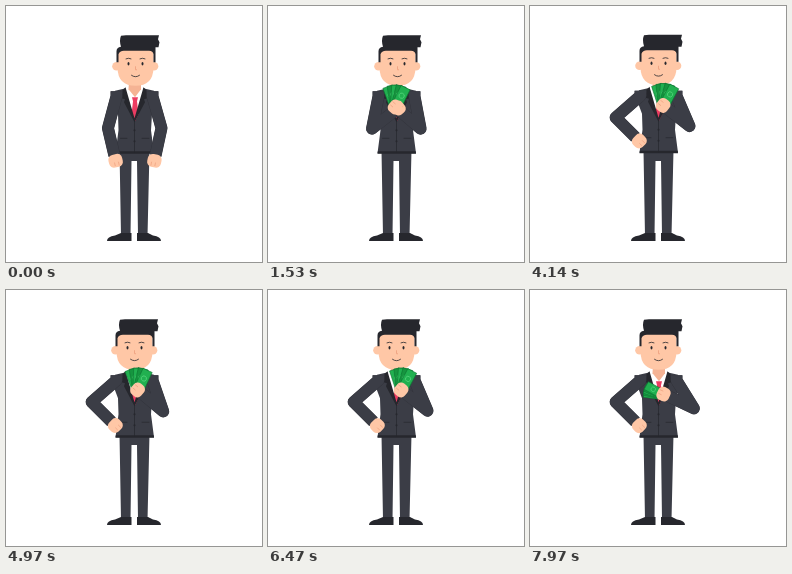
Write an HTML page that moves like this. It is 256 by 256 pixels and loops after 8000 ms.

```html
<!DOCTYPE html>
<html lang="en">
<head>
<meta charset="utf-8">
<title>Man with cash</title>
<style>
  html, body { margin: 0; width: 100%; height: 100%; overflow: hidden; background: #fff; }
  svg { display: block; width: 100%; height: 100%; }
  .suit { fill: #3b3d46; }
  .dark { fill: #26272d; }
  .skin { fill: #ffc7a6; }
  .ink { fill: none; stroke: #26272d; stroke-linecap: round; }
  .sleeve, .seam { fill: none; stroke: #3b3d46; stroke-width: 11.4; stroke-linejoin: round; }
  .seam { stroke: #303139; stroke-width: 12; }
</style>
</head>
<body>
<svg viewBox="0 0 256 256">
  <path class="suit" d="M113.500 144H143.500L141.500 230H132L131 155H125.500L124.500 230H115Z"/>
  <path class="dark" d="M101 235Q101 230.500 109 229.500L115 227H125.500V235ZM155 235Q155 230.500 147 229.500L142 227H131V235Z"/>
  <g id="upper">
    <path class="suit" d="M120 82L109 84.500L106 92L112 108L112.500 124L109.500 147H148L145 124L146 108L151 92L148 84.500L137 82Z"/>
    <path class="dark" d="M109.800 145H147.700L148 147.500H109.500Z"/>
    <path fill="#fff" d="M119.500 81H137.500L136 96L128.500 114L120 93Z"/>
    <path fill="#ec3c62" d="M126 91H132L131 95L132.500 108L129 115L125.500 108L127 95Z"/>
    <path class="dark" d="M119.500 81L116.500 84L115.500 92L119 93L118 96L128.500 116V112ZM137.500 81L140.500 84L141.500 92L138 93L139 96L128.500 116V112Z"/>
    <path class="ink" stroke-width=".7" d="M128.500 115V146M114.500 132H121M136 132H143"/>
    <g class="dark"><circle cx="128.500" cy="124" r="1"/><circle cx="128.500" cy="135" r="1"/></g>
    <path fill="#f5b394" d="M123 74H135V83L129 91L122.500 83Z"/>
    <g id="head">
      <g class="skin">
        <circle cx="110.500" cy="60" r="4.300"/><circle cx="148" cy="60" r="4.300"/>
        <path d="M111.500 43H147.500V62Q147 79.500 129.500 79.500Q112 79.500 111.500 62Z"/>
      </g>
      <path class="dark" d="M110.500 56V45Q110.500 41 115 40.500Q113 34 115 29.500L120 29H153L152 33L153.500 36L152.500 41H149.500V56H147.500V48Q147 44.500 143 44.500H118Q113.500 44.500 112.500 48V56Z"/>
      <g class="dark"><ellipse cx="122.500" cy="57.500" rx="1" ry="1.700"/><ellipse cx="136.500" cy="57.500" rx="1" ry="1.700"/></g>
      <path class="ink" stroke-width=".8" d="M120 52.500Q122.500 51.300 125 52.500M134 52.500Q136.500 51.300 139 52.500"/>
      <path class="ink" stroke-width=".8" d="M125.500 69Q129.500 72 133.500 69"/>
      <path fill="none" stroke="#f0a685" d="M129.500 60V63.500H131"/>
    </g>
    <g id="arms"></g>
  </g>
</svg>
<script>
const LOOP = 8000, BONE = 33, BILLS = 5;
const byId = id => document.getElementById(id);

function add(parent, tag, attrs = {}) {
  const node = document.createElementNS('http://www.w3.org/2000/svg', tag);
  for (const key in attrs) node.setAttribute(key, attrs[key]);
  return parent.appendChild(node);
}

const armLayer = byId('arms');

function makeArm(side) {
  return { side, seam: add(armLayer, 'path', { class: 'seam' }),
           sleeve: add(armLayer, 'path', { class: 'sleeve' }) };
}

function makeHand() {
  const hand = add(armLayer, 'g');
  add(hand, 'rect', { class: 'skin', x: -6, y: -7, width: 13, height: 14, rx: 5 });
  add(hand, 'path', { d: 'M2 -2.500H6M2 1.500H5.500', stroke: '#f0a685', 'stroke-width': .8, fill: 'none' });
  return hand;
}

function makeBill(i) {
  const bill = add(fan, 'g');
  add(bill, 'rect', { x: -5, y: -23, width: 10, height: 23, fill: i % 2 ? '#16953f' : '#21b050', stroke: '#0d7632', 'stroke-width': .6 });
  add(bill, 'circle', { cy: -14, r: 2.600, fill: 'none', stroke: '#54d47b', 'stroke-width': .8 });
  return bill;
}

const left = makeArm(-1), right = makeArm(1);
const fan = add(armLayer, 'g');
const bills = Array.from({ length: BILLS }, (_, i) => makeBill(i));
left.hand = makeHand();
right.hand = makeHand();

const point = (x, y) => ({ x, y });
const mix = (a, b, u) => a + (b - a) * u;
const move = (a, b, u) => point(mix(a.x, b.x, u), mix(a.y, b.y, u));
const wave = (t, period) => Math.cos(t / period * 2 * Math.PI);

function ease(t, from, to) {
  const u = Math.min(1, Math.max(0, (t - from) / (to - from)));
  return u * u * (3 - 2 * u);
}

const restLeft = point(109.5, 154), chestLeft = point(130, 102), hip = point(109, 135);
const restRight = point(148.5, 154), chestRight = point(127.5, 101);
const showOff = point(132.5, 100), pocket = point(134, 104);

// Two equal bones, elbow always bent outwards.
function poseArm(arm, { x, y }) {
  const sx = 128.5 + arm.side * 18, sy = 90;
  const dx = x - sx, dy = y - sy, dist = Math.hypot(dx, dy);
  const bend = Math.sqrt(Math.max(0, BONE ** 2 - dist ** 2 / 4)) / dist;
  const ex = sx + dx / 2 + arm.side * dy * bend;
  const ey = sy + dy / 2 - arm.side * dx * bend;
  const angle = Math.atan2(y - ey, x - ex);
  const wx = x - 5 * Math.cos(angle), wy = y - 5 * Math.sin(angle);
  const path = `M${sx} ${sy - 5}L${sx} ${sy}L${ex} ${ey}L${wx} ${wy}`;
  arm.seam.setAttribute('d', path);
  arm.sleeve.setAttribute('d', path);
  arm.hand.setAttribute('transform', `translate(${x} ${y}) rotate(${angle * 180 / Math.PI}) scale(1 ${-arm.side})`);
}

function draw(t) {
  const raise = ease(t, 300, 1500), open = ease(t, 1050, 1500);
  const drop = ease(t, 2660, 3340), stow = ease(t, 7450, 7970);
  const sway = wave(t - 4140, 2420) * drop * (1 - stow);

  const leftHand = move(move(restLeft, chestLeft, raise), hip, drop);
  const rightHand = move(move(move(restRight, chestRight, raise), showOff, drop), pocket, stow);
  rightHand.x += sway;
  poseArm(left, leftHand);
  poseArm(right, rightHand);

  const tilt = mix(3 + 2 * sway, -72, stow), spread = mix(46 * open, 22, stow);
  fan.setAttribute('transform', `translate(${rightHand.x} ${rightHand.y + 1}) rotate(${tilt}) scale(${open * mix(1, .88, stow)})`);
  bills.forEach((bill, i) => bill.setAttribute('transform', `rotate(${(i / (BILLS - 1) - .5) * spread})`));

  byId('upper').setAttribute('transform', `translate(0 ${.3 * wave(t, 1600)})`);
  byId('head').setAttribute('transform', `translate(${-drop} 0)`);
}

const start = performance.now();
function tick(now) {
  draw(Math.max(0, now - start) % LOOP);
  requestAnimationFrame(tick);
}
draw(0);
requestAnimationFrame(tick);
</script>
</body>
</html>
```
